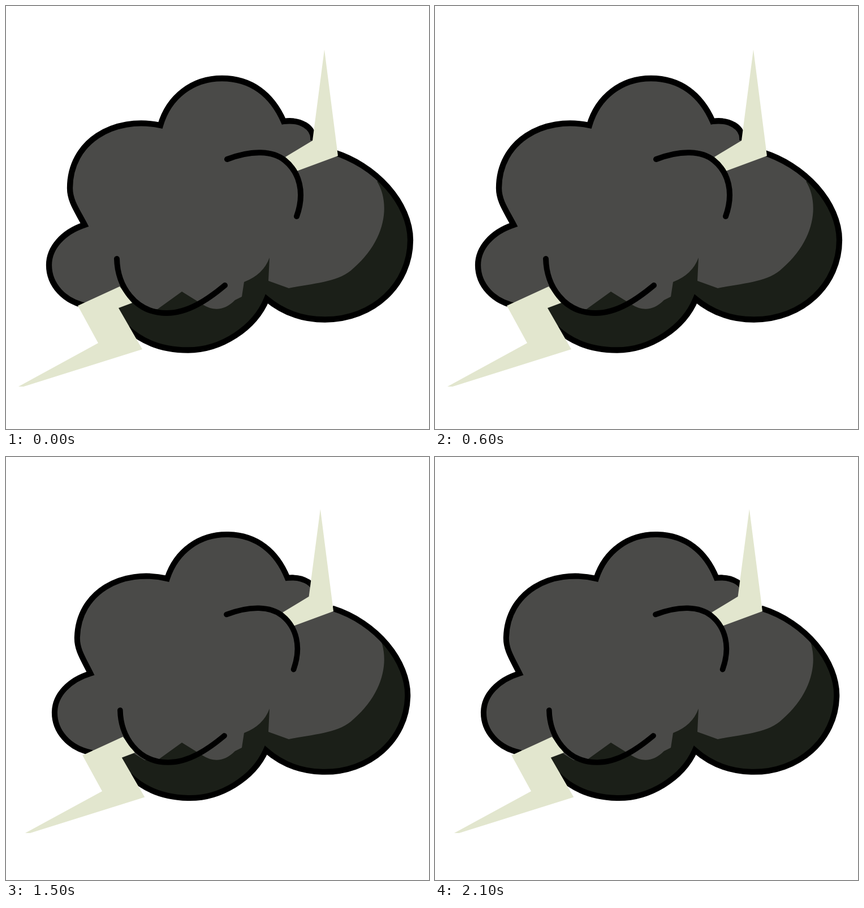
Recreate the animation shown at these times as an HTML page. Size 748 by 748 pixels, loop 2400 ms.

```html
<!DOCTYPE html>
<html lang="en">
<head>
<meta charset="utf-8">
<title>Storm cloud</title>
<style>
  html, body { margin: 0; width: 100%; height: 100%; overflow: hidden; background: #fff; }
  svg { display: block; width: 100%; height: 100%; }
  .line { fill: none; stroke: #000; stroke-width: 10.3; stroke-miterlimit: 6; }
  .arc { stroke-width: 10; stroke-linecap: round; }
  .body { fill: #4a4a48; }
  .shade { fill: #1b1f18; }
  .bolt { fill: #e2e6ce; }
</style>
</head>
<body>
<svg viewBox="0 0 748 748">
  <defs>
    <clipPath id="inside"><path class="cloud silhouette"/></clipPath>
  </defs>
  <path class="cloud silhouette body"/>
  <!-- The shadow stays put while the cloud moves around it. -->
  <path class="shade" clip-path="url(#inside)"
    d="M199 534L226 524 245 536 268 536 311 505 348 528Q378 547 405 520L417 514 421 488Q455 475 466 445
       L464 486 500 499C545 490 590 488 614 464C676 410 678 345 656 310L748 300V660H190Z"/>
  <path class="cloud outline line"/>
  <g class="strike">
    <path class="bolt" d="M563 77L587 265 514 292 494 267 542 238Z"/>
    <path class="bolt" d="M127 530L201 496 223 525 199 534 241 607 31 673H22L163 596Z"/>
    <path class="line arc" d="M391 271C435 254 472 256 493 273C519 294 529 330 514 372"/>
    <path class="line arc" d="M196 447C197 495 228 543 284 543C322 543 357 519 387 494"/>
  </g>
</svg>
<script>
const HOLD = 300;

const crown = 'M543 238C546 214 520 200 491 204C470 156 433 128 382 128' +
  'C330 128 288 160 273 211C190 194 113 240 113 322C113 345 126 362 139 387' +
  'C100 400 76 428 76 458C76 492 102 524 146 531';
const base = '215 570C245 598 282 608.5 322 608.5C380 608.5 440 570 461 518' +
  'C492 544 526 554.5 564 554.5C650 554.5 715 492 715 414C715 350 655 280 574 257';

// The squeezed pose shrinks everything a little; the cloud also tilts.
const squeeze = {
  cloud: 'matrix(.975 .026 -.028 .973 24.7 2.6)',
  strike: 'matrix(.9646 0 0 .9614 12.8 18)'
};

const each = (name, action) => document.querySelectorAll('.' + name).forEach(action);

each('silhouette', path => path.setAttribute('d', crown + 'L' + base + 'Z'));
each('outline', path => path.setAttribute('d', crown + 'M' + base));

function draw(time) {
  const squeezed = Math.floor(time / HOLD) % 2 === 1;
  for (const name in squeeze) {
    each(name, part => part.setAttribute('transform', squeezed ? squeeze[name] : 'scale(1)'));
  }
}

const start = performance.now();

function tick(now) {
  draw(Math.max(0, now - start));
  requestAnimationFrame(tick);
}
tick(start);
</script>
</body>
</html>
```
